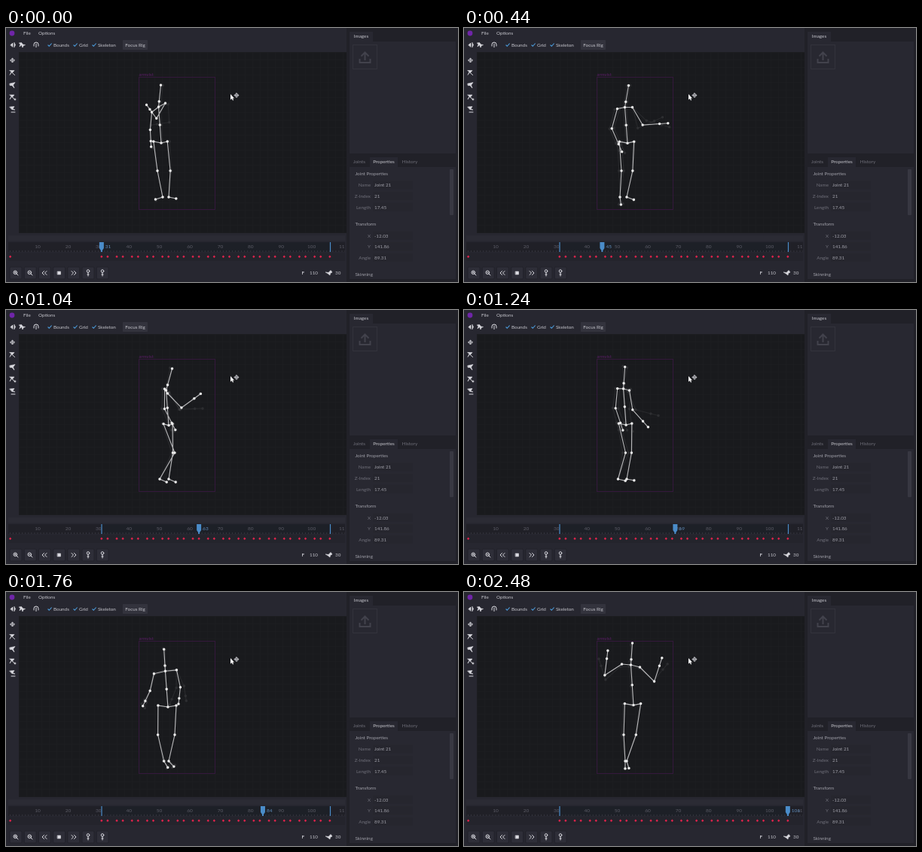
An HTML page for the animation above (2.52 s loop, 600 by 338 pixels).

```html
<!DOCTYPE html>
<html lang="en">
<head>
<meta charset="utf-8">
<title>Skeleton animation editor</title>
<style>
  html, body { margin: 0; width: 100%; height: 100%; overflow: hidden; background: #22222a; }
  svg { display: block; width: 600px; height: 338px; }
  text { font: 6.3px Lato, "Open Sans", sans-serif; fill: #c4c4cb; }
  .soft { fill: #a0a0a9; }
  .dim { fill: #70707a; }
  .end { text-anchor: end; }
  .mid { text-anchor: middle; }
  .tick { font-size: 6.5px; fill: #5c5c67; }
  .icon { fill: none; stroke: #dadae0; stroke-linecap: round; stroke-linejoin: round; }
  .solid { fill: #dadae0; stroke-width: .6; }
  .bone { fill: none; stroke: #b8b8ba; stroke-width: 1.1; stroke-linejoin: round; }
  .joint { fill: none; stroke: #ececec; stroke-width: 3.5; stroke-linecap: round; }
  .blue { fill: #4a8cc9; }
</style>
</head>
<body>
<svg viewBox="0 0 600 338">
  <defs>
    <pattern id="grid" x="17" y="32" width="10" height="10" patternUnits="userSpaceOnUse">
      <path d="M0 .5H10M.5 0V10" stroke="#1c1d20" fill="none"/>
    </pattern>
    <path id="move" d="M-2.5 0H2.5M0-2.5V2.5M-2-1L-3 0L-2 1ZM2-1L3 0L2 1ZM-1-2L0-3L1-2ZM-1 2L0 3L1 2Z" stroke-width=".7"/>
    <path id="limb" class="solid" d="M-3.5-3H2.5L0 0L3.5 3.5L-1-.5L-3.5 3L-1.500-1Z"/>
    <path id="check" d="M-2.4 0L-.7 1.8L2.6-2" fill="none" stroke="#4c9ee0" stroke-width="1.1"/>
  </defs>

  <rect width="600" height="338" fill="#272730"/>
  <rect x="17" y="32" width="435" height="241" fill="#191a1d"/>
  <rect x="17" y="32" width="435" height="241" fill="url(#grid)"/>

  <!-- menu and toolbar -->
  <circle cx="8" cy="7" r="3.4" fill="#6f25a8"/>
  <text x="23" y="9.3">File</text>
  <text x="43" y="9.3">Options</text>
  <g class="icon">
    <path class="solid" d="M6 22.5L9 20V25ZM11 19.5L12.500 22.500L11 25.500Z"/>
    <path class="solid" d="M17.500 20L20.500 19.500L22.500 22L25.500 22.500L23 23.500L22 26L20.500 22.500L18 25L19 21.500Z"/>
    <path d="M37 24V22A3 3 0 0 1 43 22V24M40 21V25.500"/>
  </g>
  <use href="#check" x="58" y="22.5"/><text x="63" y="25">Bounds</text>
  <use href="#check" x="92" y="22.5"/><text x="97" y="25">Grid</text>
  <use href="#check" x="117" y="22.5"/><text x="122" y="25">Skeleton</text>
  <rect x="155" y="16" width="33" height="13" rx="1" fill="#33333d"/>
  <text x="171.5" y="25" class="mid">Focus Rig</text>
  <g class="icon">
    <use href="#move" x="8.5" y="43"/>
    <use href="#limb" x="8.5" y="59.5"/>
    <path class="solid" d="M5 74L12 72.500L9.500 76L11 80L8 76.500L5.500 76.500Z"/>
    <use href="#limb" x="8.5" y="92"/><path d="M11 95H13M12 94V96"/>
    <path class="solid" d="M5 105L11 104.500L9 107.500L12 109L8 108.500Z"/><path d="M7 112H12"/>
  </g>

  <!-- right panels -->
  <rect x="452" width="148" height="338" fill="#212128"/>
  <g fill="#282831">
    <rect x="456" y="18" width="141" height="149"/>
    <rect x="456" y="5" width="31" height="13"/>
    <rect x="456" y="185" width="141" height="149"/>
    <rect x="483" y="172" width="37" height="13"/>
  </g>
  <text x="471.5" y="13.3" class="mid">Images</text>
  <rect x="460.5" y="22.5" width="32" height="32" fill="none" stroke="#33333c"/>
  <path d="M476.500 43V33M471.500 37.500L476.500 32.500L481.500 37.500M469.500 41V46H483.500V41" fill="none" stroke="#42424c" stroke-width="2"/>
  <text x="469" y="180.3" class="mid dim">Joints</text>
  <text x="501.5" y="180.3" class="mid">Properties</text>
  <text x="536" y="180.3" class="mid dim">History</text>
  <rect x="589" y="188" width="5" height="61" rx="1" fill="#383842"/>
  <text x="463.5" y="196" class="soft">Joint Properties</text>
  <text x="463.5" y="263" class="soft">Transform</text>
  <text x="463.5" y="330.3" class="soft">Skinning</text>
  <g id="fields"></g>

  <!-- timeline -->
  <rect x="3" y="276" width="447" height="7" fill="#2b2b34"/>
  <rect x="3" y="285" width="447" height="13" fill="#202027"/>
  <rect x="127" y="285" width="303" height="13" fill="#1d2027"/>
  <rect x="3" y="299" width="447" height="11" fill="#24242c"/>
  <path d="M5.200 297H450" stroke="#3a3a44" stroke-width="2" stroke-dasharray=".8 3.240"/>
  <g id="ruler"></g>
  <path d="M127 285V298M430.5 285V298" stroke="#4a8cc9" stroke-width="1.2"/>
  <path id="keys" fill="#e0234c"/>
  <g id="head">
    <path class="blue" d="M-3 285H3V293L1 296V298H-1V296L-3 293Z"/>
    <text id="count" x="5" y="293.3" class="tick" style="fill:#5f8fc0"></text>
  </g>

  <!-- playback controls -->
  <g id="buttons" fill="#2e2e38" stroke="#22222a"></g>
  <g class="icon">
    <circle cx="12.300" cy="325.300" r="2.300"/><path d="M14 327L16 329M11.500 325.300H13M12.300 324.500V326"/>
    <circle cx="31.300" cy="325.300" r="2.300"/><path d="M33 327L35 329M30.500 325.300H32"/>
    <path class="solid" d="M68.500 324H72.500V328H68.500Z"/>
    <path id="rewind" d="M50.500 323.500L48 326L50.500 328.500M54 323.500L51.500 326L54 328.500"/>
    <use href="#rewind" transform="matrix(-1 0 0 1 141 0)"/>
    <g id="pin"><circle cx="109" cy="323.500" r="1.800"/><path d="M109 325.500V330M108 328H110"/></g>
    <use href="#pin" x="19"/>
    <path class="solid" d="M424.500 325L428 325.500L431 322.500L433 325L430.500 326.500L430 329L427.500 327Z"/>
  </g>
  <text x="392.5" y="328.3" style="font-weight:bold">F</text>
  <text x="403" y="328.3">110</text>
  <text x="437" y="328.3">30</text>

  <!-- stage -->
  <text x="176.5" y="64" style="fill:#5a1c66;font-size:6px">armvist</text>
  <rect x="176.5" y="65.5" width="101" height="176" fill="none" stroke="#34183c"/>
  <g id="rig"></g>
  <path d="M298 88V95.500L299.700 94L301 96.500L302 96L301 93.500H303Z" fill="#fff"/>
  <use href="#move" x="306" y="89.500" class="icon"/>
</svg>
<script>
const $ = id => document.getElementById(id);
const svgNS = 'http://www.w3.org/2000/svg';
function add(parent, tag, attrs, content = '') {
  const el = parent.appendChild(document.createElementNS(svgNS, tag));
  for (const name in attrs) el.setAttribute(name, attrs[name]);
  el.textContent = content;
  return el;
}

const firstFrame = 31, lastFrame = 106;
const frameX = n => 42 + (n - 10) * 4.04;

const fields = { Name: 'Joint 21', 'Z-Index': '21', Length: '17.45', X: '-12.03', Y: '141.86', Angle: '89.31' };
Object.entries(fields).forEach(([name, value], i) => {
  const y = 209 + i * 14.6 + (i > 2 ? 23.5 : 0);
  add($('fields'), 'rect', { x: 487, y: y - 5.5, width: 53, height: 11, fill: '#26262e' });
  add($('fields'), 'text', { x: 484, y: y + 2.3, class: 'end dim' }, name);
  add($('fields'), 'text', { x: 489, y: y + 2.3, class: 'soft' }, value);
});
for (let n = 10; n <= 100; n += 10)
  add($('ruler'), 'text', { x: frameX(n), y: 293.3, class: 'tick mid' }, n);
add($('ruler'), 'text', { x: 442, y: 293.3, class: 'tick' }, '11');
for (let i = 0; i < 7; i++)
  add($('buttons'), 'rect', { x: 5 + i * 19.2, y: 318, width: 16, height: 16, rx: 1.5 });

let diamonds = '';
const addDiamond = n => diamonds += `M${frameX(n) - 1.7} 304.3l1.7-1.7 1.7 1.7-1.7 1.7z`;
addDiamond(1);
for (let n = firstFrame; n <= lastFrame; n += 2.5) addDiamond(Math.floor(n));
$('keys').setAttribute('d', diamonds);

// Dance keys: when each pose is struck, then one value per pose. Angles in degrees, clockwise from right.
const keySteps = [0, 6, 16, 26, 37, 52, 62];
const dance = {
  body: [204, 210, 220, 214, 212, 214, 223],
  bob: [0, 1, 0, 2, -3, 4, -8],
  nod: [3, 5, 5, 8, -5, 2, 2],
  shoulder: [9, 14, 6, 2, 15, 15, 12],
  tilt: [-6, -3, 1, 3, -1, -4, 2],
  forearm: [15, 19, 26, 21, 20, 9, 22],
  leftArm: [95, 103, 108, 90, 102, 104, 147],
  leftElbow: [87, 67, 66, 63, 82, 153, 277],
  rightArm: [120, 20, 100, 46, 122, 27, 45],
  rightElbow: [234, 45, -53, -36, 149, 36, -72],
  leftKnee: [201, 201, 217, 224, 203, 200, 212],
  leftAnkle: [208, 208, 206, 204, 205, 215, 214],
  leftToe: [163, 129, 35, 23, 0, 127, 90],
  rightToe: [12, 6, 35, 23, -6, 107, 73],
};

const mix = (a, b, u) => a + (b - a) * u;
const between = (p, q, u) => [mix(p[0], q[0], u), mix(p[1], q[1], u)];
const reach = ([x, y], length, degrees) => {
  const angle = degrees * Math.PI / 180;
  return [x + length * Math.cos(angle), y + length * Math.sin(angle)];
};

function sample(step) {
  const now = Math.min(62, Math.max(0, step));
  const k = Math.max(1, keySteps.findIndex(s => s >= now));
  const u = (now - keySteps[k - 1]) / (keySteps[k] - keySteps[k - 1]);
  return Object.fromEntries(Object.entries(dance).map(([name, v]) => [name, mix(v[k - 1], v[k], u)]));
}

function pose(step) {
  const d = sample(step);
  const pelvis = [d.body + 2, 153 + d.bob * 0.3];
  const chest = [d.body - 1.5, 105 + d.bob];
  const head = [chest[0] + d.nod, 76 + d.bob];
  const hipWidth = 5 + d.shoulder * 0.47;

  const arm = (side, upper, lower) => {
    const shoulder = [chest[0] + side * d.shoulder, chest[1] + 1 + side * d.tilt];
    const elbow = reach(shoulder, 16 + d.forearm / 2, upper);
    const wrist = reach(elbow, d.forearm, lower);
    return [chest, shoulder, elbow, wrist, reach(wrist, d.forearm / 2, lower)];
  };
  const leg = (side, kneeX, ankleX, toe) => {
    const hip = [pelvis[0] - 1 + side * hipWidth, pelvis[1] - 2];
    const ankle = [ankleX, 225];
    const knee = [kneeX ?? between(hip, ankle, 0.5)[0] + 3, 190];
    return [pelvis, hip, knee, ankle, reach(ankle, 10, toe)];
  };
  return [
    [pelvis, between(pelvis, chest, 0.5), chest, between(chest, head, 0.25), head],
    arm(-1, d.leftArm, d.leftElbow),
    arm(1, d.rightArm, d.rightElbow),
    leg(-1, d.leftKnee, d.leftAnkle, d.leftToe),
    leg(1, undefined, 216, d.rightToe), // planted foot
  ];
}

// Faint onion skins before and after the current pose.
const figures = [[-2, 0.09], [2, 0.09], [0, 1]].map(([offset, opacity]) => {
  const group = add($('rig'), 'g', { opacity });
  return { offset, bone: add(group, 'path', { class: 'bone' }), joint: add(group, 'path', { class: 'joint' }) };
});

function draw() {
  const step = Math.floor(performance.now() % 2520 / 40);
  const frame = firstFrame + Math.ceil(step * 6 / 5);
  for (const { offset, bone, joint } of figures) {
    const chains = pose(step + offset);
    bone.setAttribute('d', chains.map(points => 'M' + points.join('L')).join(''));
    joint.setAttribute('d', chains.flat().map(p => `M${p}h0`).join(''));
  }
  $('head').setAttribute('transform', `translate(${frameX(frame)})`);
  $('count').textContent = frame;
  requestAnimationFrame(draw);
}
draw();
</script>
</body>
</html>
```
